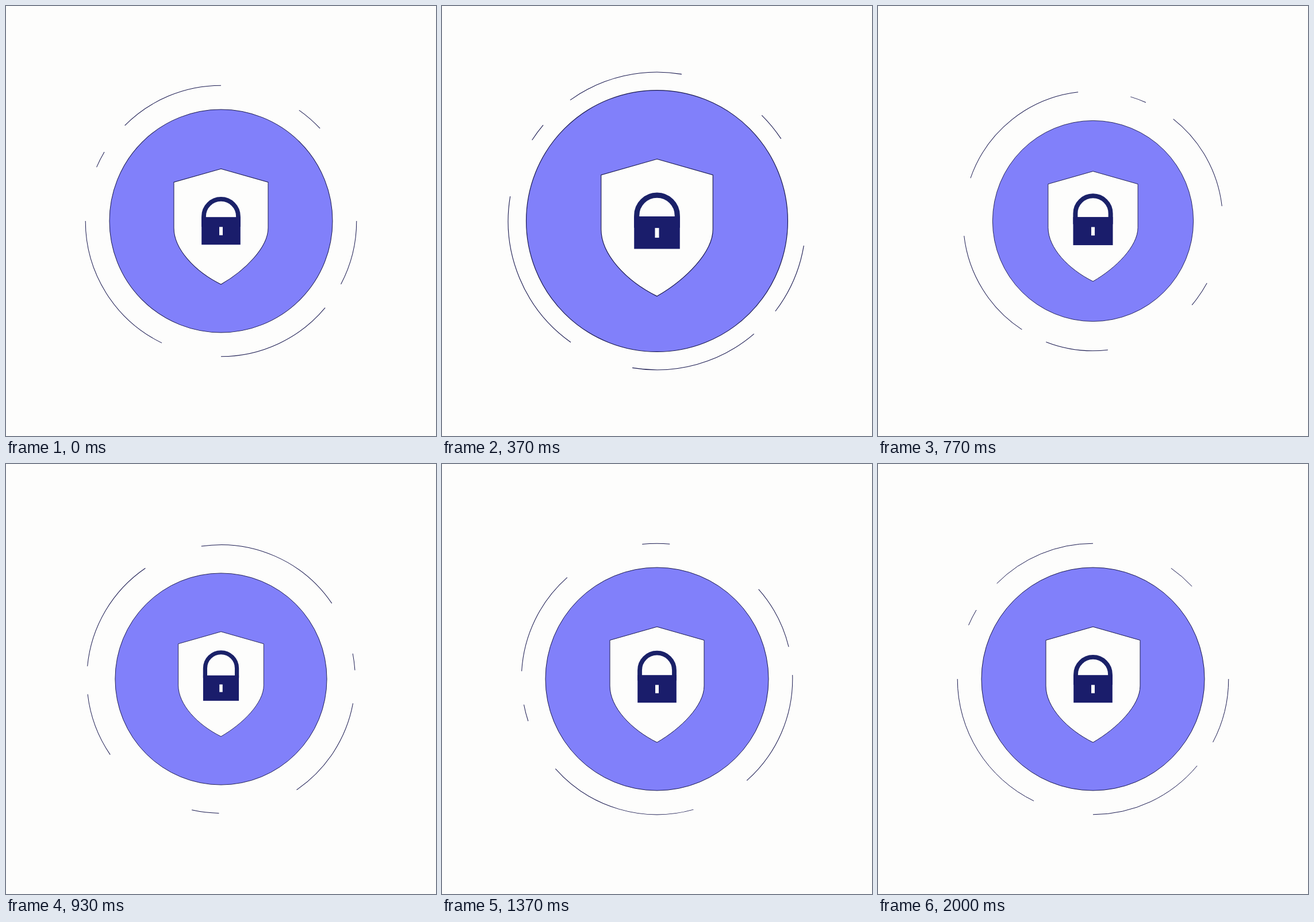
These frames come from a looping animation (748x748 px, 2030 ms). An HTML page without scripts:

```html
<!DOCTYPE html>
<html lang="en">
<head>
<meta charset="utf-8">
<title>Security shield</title>
<style>
  html, body {
    margin: 0;
    width: 100%;
    height: 100%;
    overflow: hidden;
    background: #fdfdfc;
  }
  svg {
    display: block;
    width: 100%;
    height: 100%;
  }
  .ring, .disc, .shield, .lock, .shackle {
    --smooth: cubic-bezier(.333, 0, .667, 1);
    transform-origin: 374px 374px;
    animation: 2.03s var(--smooth) infinite;
  }
  .line { stroke: #1a1a50; stroke-width: 1; }
  .ring { animation-name: ring, spin; }
  .disc { animation-name: disc; }
  .shield { animation-name: shield; }
  .lock { animation-name: lock; }
  .shackle { animation-name: lift; }

  /* One turn, slow at both ends */
  @keyframes spin {
    0% { rotate: 0deg; animation-timing-function: cubic-bezier(.333, -.004, .667, .014); }
    49.26% { rotate: 180deg; animation-timing-function: cubic-bezier(.333, 1.074, .667, .945); }
    98.52%, 100% { rotate: 360deg; }
  }

  /* Staggered pulses: swell, dip, settle */
  @keyframes ring {
    0% { scale: 1; }
    17.24% { scale: 1.1; }
    32.84% { scale: .947; }
    50.9%, 100% { scale: 1; }
  }
  @keyframes disc {
    0% { scale: 1; }
    18.88% { scale: 1.173; }
    37.77% { scale: .9; }
    54.2%, 100% { scale: 1; }
  }
  @keyframes shield {
    0% { scale: 1; }
    22.17% { scale: 1.203; }
    43.68% { scale: .9; }
    57.5%, 100% { scale: 1; }
  }
  @keyframes lock {
    0% { scale: 1; }
    24.63% { scale: 1.212; }
    46.8% { scale: .918; }
    60.76%, 100% { scale: 1; }
  }
  @keyframes lift {
    0%, 31.2% { translate: 0 0; }
    47.6%, 54.2% { translate: 0 -12.6px; }
    83.74%, 100% { translate: 0 0; }
  }
</style>
</head>
<body>
<svg viewBox="0 0 748 748" fill="none">
  <circle class="ring line" cx="374" cy="374" r="235.8" pathLength="360"
    stroke-dasharray="27.8 12 50.2 25.9 64.1 23.4 7.2 14.2 45.2 35.2 11.7 43.1"/>
  <circle class="disc line" cx="374" cy="374" r="194" fill="#8180fa"/>
  <path class="shield line" fill="#fdfdfc"
    d="M374 283.2 L456 306.5 V386 C456 420 416 460 374 484.3 C329 462 292 423 292 386 V306.5 Z"/>
  <g class="lock">
    <path class="shackle" stroke="#1a2168" stroke-width="7.8"
      d="M344 384 V365.9 a30 30 0 0 1 60 0 V384"/>
    <rect x="340.2" y="367.2" width="67.6" height="48" fill="#1a1d6b"/>
    <rect x="371" y="384.3" width="6" height="14.4" fill="#fdfdfc"/>
  </g>
</svg>
</body>
</html>
```
